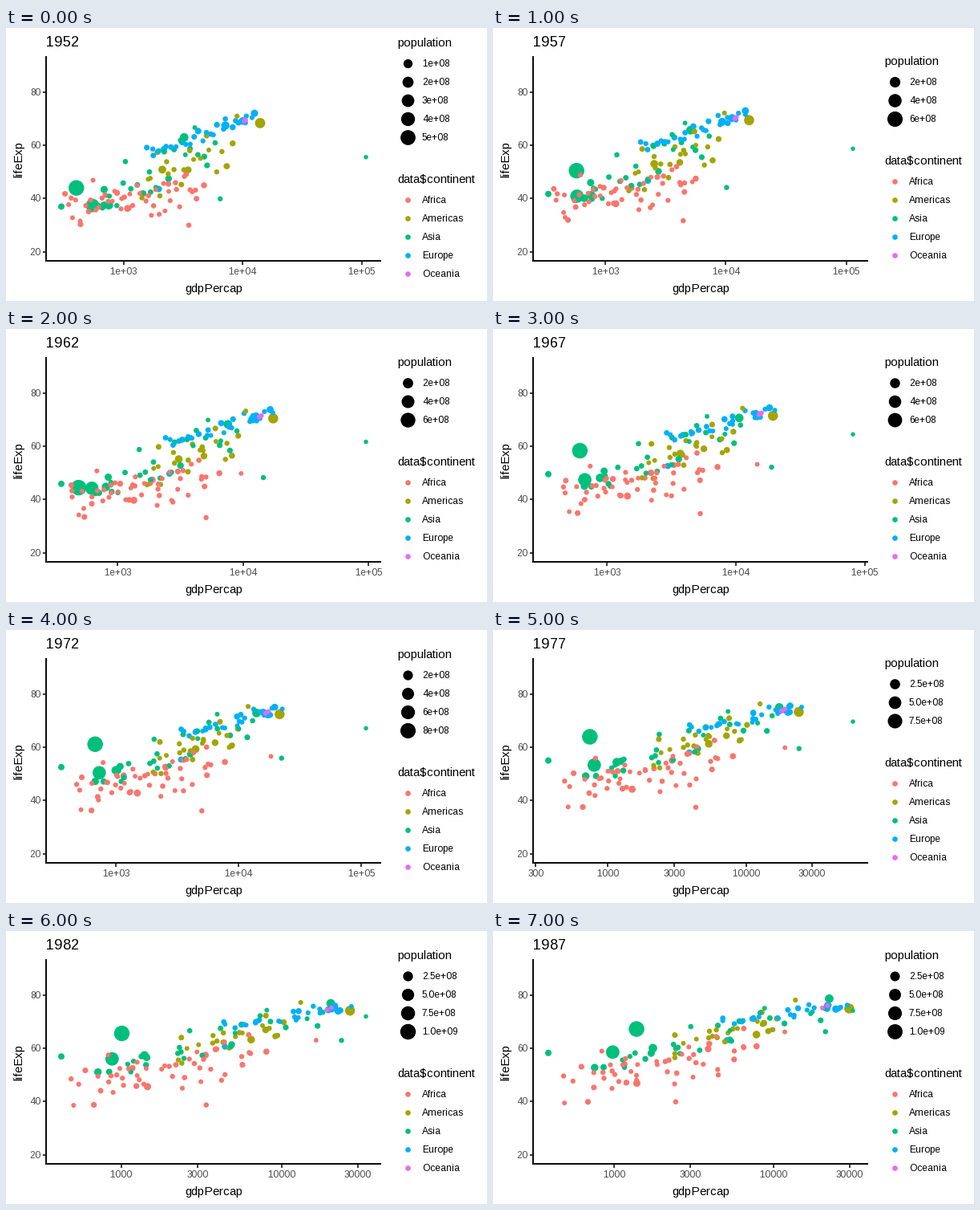
Recreate the animation shown at these times as a matplotlib script. Size 600 px wide and 340 px high, loop 8000 ms.

```python
import numpy as np
import matplotlib.pyplot as plt
from matplotlib.animation import FuncAnimation

W, H, DPI = 600, 340, 100
PX = 72 / DPI
STEPS = 8
U = np.linspace(0, 1, STEPS)
ARC = 4 * U * (1 - U)
plt.rcParams["font.family"] = "Liberation Sans"
plt.rcParams["text.hinting_factor"] = 1  # whole-pixel letter spacing

fig = plt.figure(figsize=(W / DPI, H / DPI), dpi=DPI, facecolor="white")
ax = fig.add_axes([0, 0, 1, 1])
rng = np.random.default_rng(7)

COLORS = {"Africa": "#F8766D", "Americas": "#A3A500", "Asia": "#00BF7D",
          "Europe": "#00B0F6", "Oceania": "#E76BF3"}

# Income range per step; it sets the x axis
X_MIN = [299, 336, 355, 349, 357, 371, 424, 385]
X_MAX = [108382, 113523, 95458, 80895, 109348, 59265, 33693, 31541]
TOP_POP = 556 * (1086 / 556) ** U ** 0.84

# Population factor over the loop, mid-way lift of log10 income and of life
TREND = {"Africa": (2.4, 0.05, 0.5), "Americas": (1.75, 0.02, 0.3),
         "Asia": (1.95, 0.03, 1), "Europe": (1.2, 0.06, 0.7),
         "Oceania": (1.7, 0.04, 0.2)}

# Key points: population (millions), income and life at start and end, income lift
LANDMARKS = {
    "Africa": [(33, 1077, 36.3, 1385, 46.9, 0.08), (22, 1419, 41.9, 3885, 59.8, 0),
               (14, 4725, 45, 7826, 60.8, 0.09), (4, 3521, 30, 2430, 39.9, 0.25),
               (1, 2388, 42.7, 11770, 66.2, 0.5)],
    "Americas": [(158, 13990, 68.4, 29884, 75, 0), (57, 2109, 50.9, 7807, 65.2, 0),
                 (30, 3478, 50.8, 8688, 69.5, 0.04)],
    "Asia": [(372, 547, 37.4, 977, 58.6, -0.02), (82, 750, 37.5, 1748, 60.1, -0.09),
             (86, 3217, 63, 22376, 78.7, 0.16), (47, 684, 37.5, 752, 52.8, -0.03),
             (41, 685, 43.4, 1705, 58.2, -0.03), (4, 6460, 39.9, 21198, 66.3, 0.25)],
    "Europe": [(22, 1969, 43.6, 5089, 63.1, 0), (69, 7144, 67.5, 24639, 74.8, 0.08),
               (50, 9980, 69.2, 21665, 75, 0.01)],
}

# Clouds: count, typical population, then the line (income, life to income, life)
# and the spread around it, at start and at end
CLOUDS = {
    "Africa": (47, 3.5, (310, 37.5, 4300, 44), 4, (480, 47, 6500, 61), 4.5),
    "Americas": (22, 4, (1400, 44, 9500, 65), 5, (2400, 60, 14000, 75), 2.5),
    "Asia": (24, 6, (560, 38, 6000, 61), 5, (750, 53, 21000, 75), 3),
    "Europe": (27, 9, (1500, 57, 13500, 71.5), 1.8, (4800, 70, 29000, 76.5), 1.3),
    "Oceania": (2, 5, (10000, 69, 10600, 69.4), 0.1, (19000, 74.5, 21900, 76), 0.1),
}


def path(name, pop, g0, l0, g1, l1, lift):
    """Income (log10), life and population at every step."""
    growth, _, lift_life = TREND[name]
    g = np.log10(g0) + np.log10(g1 / g0) * U + lift * ARC
    return g, l0 + (l1 - l0) * U + lift_life * ARC, pop * growth ** U


def cloud(name, n, pop, start, spread0, end, spread1):
    u0 = (np.arange(n) + rng.random(n)) / n
    u1 = np.clip(u0 + rng.normal(0, 0.1, n), 0, 1)
    noise = np.clip(rng.normal(0, 1, n), -2, 2)
    pops = pop * np.exp(rng.normal(0, 0.8, n))

    def place(u, line, spread):
        g_lo, l_lo, g_hi, l_hi = line
        return g_lo * (g_hi / g_lo) ** u, l_lo + (l_hi - l_lo) * u + spread * noise

    rows = zip(pops, *place(u0, start, spread0), *place(u1, end, spread1))
    return [path(name, *row, TREND[name][1]) for row in rows]


def giant():
    """The most populous dot: a dip early on, then a steady climb."""
    keys = [0, 1, 2, 3, 5, 7]
    steps = np.arange(STEPS)
    g = np.interp(steps, keys, np.log10([400, 576, 488, 613, 741, 1379]))
    return g, np.interp(steps, keys, [44, 50.5, 44.5, 58.4, 64, 67.3]), TOP_POP


def edge(limits, pop, l0, l1, lift):
    return np.log10(limits), l0 + (l1 - l0) * U + lift * ARC, pop * 2 ** U


tracks = [("Asia", giant()),
          ("Asia", edge(X_MIN, 20, 37, 58.3, 3.5)),
          ("Asia", edge(X_MAX, 0.2, 55.6, 74.2, 1))]
for name in COLORS:
    tracks += [(name, path(name, *row)) for row in LANDMARKS.get(name, [])]
    tracks += [(name, track) for track in cloud(name, *CLOUDS[name])]
tracks.sort(key=lambda t: -t[1][2][0])
TRACKS = np.array([track for _, track in tracks])
POINT_COLORS = [COLORS[name] for name, _ in tracks]


def y_px(life):
    return 344.9 - 3.3112 * life


def x_px(log_g, i):
    lo, hi = np.log10([X_MIN[i], X_MAX[i]])
    return 69 + 380 * (log_g - lo) / (hi - lo)


def mark_size(pop, i):
    return 1 + 5 * np.sqrt(np.clip(pop / TOP_POP[i], 0, 1))


def dots(x, y, size, color):
    diameter = (2.845 * np.asarray(size) + 2.4) * PX
    ax.scatter(x, y, s=diameter ** 2, c=color, linewidths=0, zorder=2)


def text(x, y, s, px, color="black", **kw):
    ax.text(x, y, s, fontsize=px * PX, color=color, va="baseline", **kw)


def line(xs, ys, color):
    ax.plot(xs, ys, color=color, lw=1.89 * PX, solid_capstyle="butt", zorder=3)


def x_ticks(i):
    """Powers of ten on a wide range, else also their triples."""
    if np.log10(X_MAX[i] / X_MIN[i]) > 2.3:
        values, form = [1e3, 1e4, 1e5], "%.0e"
    else:
        values, form = [300, 1000, 3000, 10000, 30000], "%d"
    ticks = [(x_px(np.log10(v), i), form % v) for v in values]
    return [t for t in ticks if 50 < t[0] < 468]


def pop_ticks(i):
    top = TOP_POP[i]
    step = 100 if top < 600 else 200 if top < 900 else 250
    form = "%.1e" if step == 250 else "%.0e"
    return [(form % (v * 1e6), mark_size(v, i), "black")
            for v in np.arange(step, top, step)]


def draw_axes(i):
    line([50, 50], [35.3, 291], "black")
    line([49, 468], [290, 290], "black")
    for v in (20, 40, 60, 80):
        y = y_px(v)
        line([45.5, 49], [y, y], "#333333")
        text(43, y + 4, str(v), 11.73, "#4D4D4D", ha="right")
    for x, label in x_ticks(i):
        line([x, x], [291, 294.5], "#333333")
        text(x, 307, label, 11.73, "#4D4D4D", ha="center")
    text(259, 329, "gdpPercap", 14.67, ha="center")
    text(20, 163, "lifeExp", 14.67, ha="center", rotation=90,
         rotation_mode="anchor")
    text(50, 23, str(1952 + 5 * i), 17.6)


def draw_key(top, title, entries):
    """Legend block of (label, size, colour); returns the y of its last row."""
    text(488, top + 5, title, 14.67)
    for k, (label, size, color) in enumerate(entries):
        y = top + 26 + 23.04 * k
        dots([501], [y], size, color)
        text(519, y + 4, label, 11.73)
    return y


def draw(i):
    ax.clear()
    ax.set(xlim=(0, W), ylim=(H, 0))
    ax.axis("off")
    g, life, pop = TRACKS[:, :, i].T
    dots(x_px(g, i), y_px(life), mark_size(pop, i), POINT_COLORS)
    draw_axes(i)
    pops = pop_ticks(i)
    last = draw_key(18 + 11.52 * (5 - len(pops)), "population", pops)
    draw_key(last + 52, "data$continent",
             [(name, 1.5, color) for name, color in COLORS.items()])
    return []


anim = FuncAnimation(fig, draw, frames=STEPS, interval=1000,
                     init_func=lambda: draw(0), repeat=True, repeat_delay=0)
plt.show()
```
